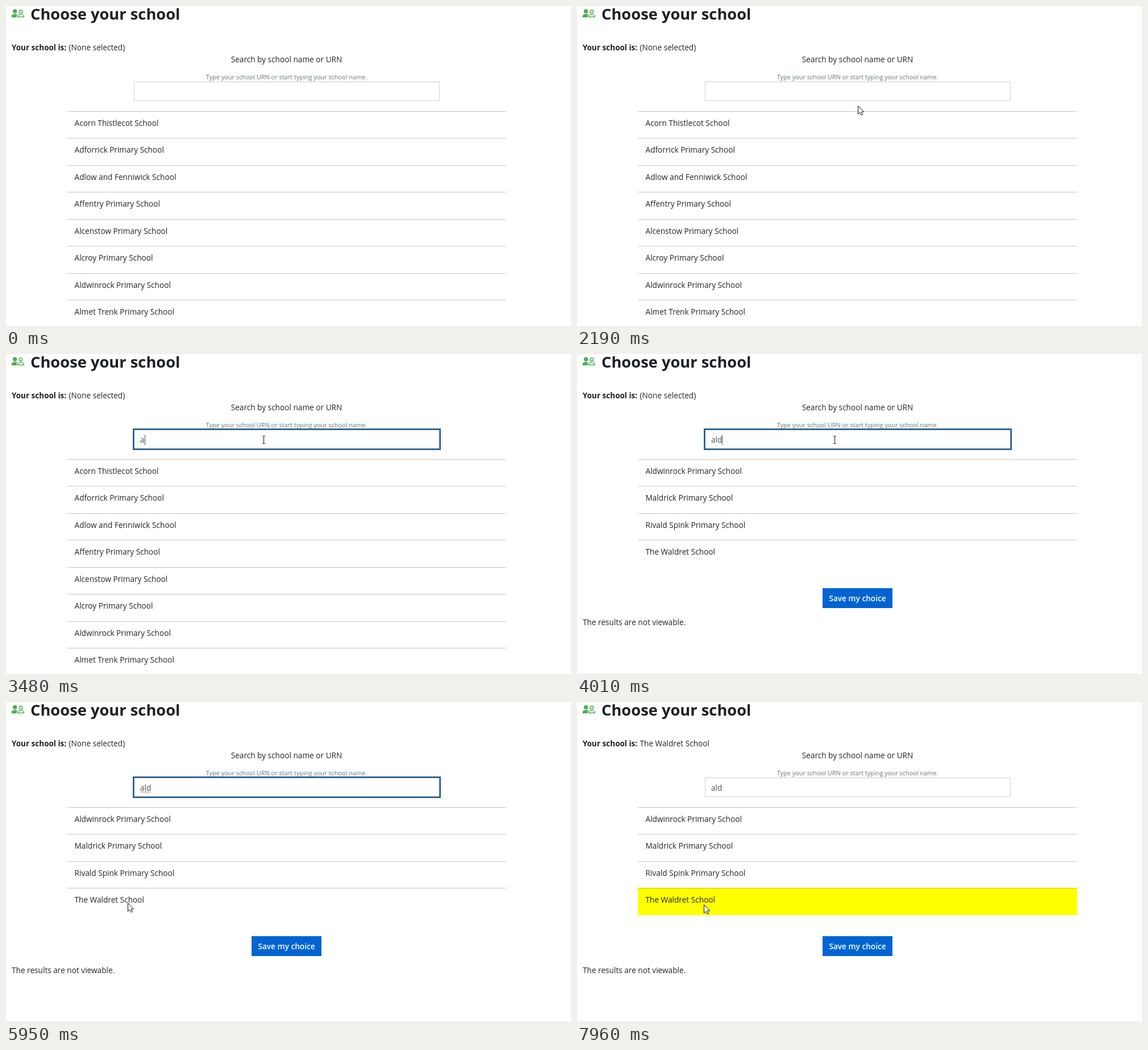
Write an HTML page that moves like this. It is 994 by 563 pixels and loops after 8000 ms.

```html
<!DOCTYPE html>
<html lang="en">
<head>
<meta charset="utf-8">
<title>Choose your school</title>
<style>
html, body { margin: 0; width: 100%; height: 100%; overflow: hidden; background: #fff; }
svg { display: block; width: 994px; height: 563px; }
text { font: 13.65px "Open Sans", "Noto Sans", sans-serif; fill: #212529; white-space: pre; }
.title { font-size: 27.3px; font-weight: 700; fill: #1d2125; }
.bold { font-size: 13.5px; font-weight: 700; fill: #1d2125; }
.mid { text-anchor: middle; }
.hint { font-size: 10.95px; fill: #6a737b; }
.typed { fill: #495057; }
.button { font-weight: 600; fill: #fff; }
</style>
</head>
<body>
<svg viewBox="0 0 994 563">
  <rect width="994" height="563" fill="#fff"/>
  <g fill="#4caf50">
    <circle cx="15.7" cy="9.2" r="3.7"/>
    <path d="M9.8 20v-2.2c0-2.4 3.2-3.8 6-3.8 1.6 0 3.2.4 4.4 1.1-1 .8-1.5 1.8-1.5 2.9v2z"/>
    <g fill="none" stroke="#4caf50" stroke-width="1.5">
      <circle cx="26" cy="9.8" r="2.8"/>
      <path d="M20.7 19.3v-1.3c0-1.8 2.7-3 5.3-3s5.3 1.2 5.3 3v1.3z"/>
    </g>
  </g>
  <text class="title" x="43" y="24">Choose your school</text>
  <text class="bold" x="10" y="78">Your school is:</text>
  <text id="chosen" x="110.5" y="78"></text>
  <text class="mid" x="493.5" y="99">Search by school name or URN</text>
  <text class="hint mid" x="493.5" y="129">Type your school URN or start typing your school name.</text>

  <rect id="field" x="225.5" y="133.5" width="537" height="33" fill="#fff"/>
  <rect id="ring" x="224" y="132" width="540" height="36" fill="none" stroke="#2a5f8c" stroke-width="2"/>
  <text id="typed" class="typed" x="236" y="156"></text>
  <path id="squiggle" fill="none" stroke="#e03c3c" stroke-width="1"/>
  <rect id="caret" y="142" width="1" height="18" fill="#495057"/>

  <rect id="mark" x="107" y="327" width="773" height="48" fill="#ff0"/>
  <g id="rows"></g>

  <g id="footer">
    <rect x="432" y="412" width="123" height="35" fill="#0064d2"/>
    <text class="button mid" x="493.5" y="435">Save my choice</text>
    <text x="10" y="477">The results are not viewable.</text>
    <rect y="562" width="990" height="1" fill="#e9eaec"/>
  </g>

  <path id="arrow" d="M.5.8V15.4L3.9 12.2 6.2 17 8.5 16 6.2 11.2H10.6Z" fill="#fff" stroke="#111" stroke-linejoin="round"/>
  <path id="beam" d="M-3-5.5H-1.2L-.5-5 .2-5.5H2M-.5-5V7M-3 7.5H-1.2L-.5 7 .2 7.5H2" fill="none" stroke="#333" stroke-width="1.2"/>
</svg>
<script>
const LOOP = 8000;
const CLICK = 2600, BLUR = 6070, PICK = 6130;
const $ = id => document.getElementById(id);
const primary = name => name + ' Primary School';

const allSchools = [
  'Acorn Thistlecot School',
  primary('Adforrick'),
  'Adlow and Fenniwick School',
  ...['Affentry', 'Alcenstow', 'Alcroy', 'Aldwinrock', 'Almet Trenk'].map(primary)
];
const alSchools = [
  ...allSchools.slice(4),
  ...['Alnwold', 'Alpenside', 'Alquorn House'].map(primary),
  'Altrick Cross Secondary School and Sixth Form College'
];
const aldSchools = [
  ...['Aldwinrock', 'Maldrick', 'Rivald Spink'].map(primary),
  'The Waldret School'
];

// time, typed text, caret x, visible list
const stages = [
  [0, '', 237, allSchools],
  [3480, 'a', 244, allSchools],
  [3780, 'al', 248, alSchools],
  [4010, 'ald', 255, aldSchools]
];

// time, is the caret shown
const blinks = [[0, 0], [CLICK, 1], [3120, 0], [3480, 1], [4510, 0], [5040, 1], [5570, 0]];

const easeOut = u => 1 - (1 - u) ** 2.2;
const easeBoth = u => u * u * (3 - 2 * u);
const linear = u => u;

// start, end, from, to, easing
const moves = [
  [1210, 1830, [936, 555], [506, 182], easeOut],
  [2150, 2190, [506, 182], [495, 175], linear],
  [2190, 2350, [495, 175], [454, 150], easeOut],
  [5400, 5950, [454, 150], [214, 353], easeBoth],
  [7945, 7960, [214, 353], [223, 356], linear]
];

const clamp = u => Math.min(1, Math.max(0, u));
const lastAt = (list, t) => list.filter(item => item[0] <= t).pop();
const show = (id, on) => $(id).setAttribute('visibility', on ? 'visible' : 'hidden');
const mix = (a, b, u) => a.map((v, i) => v + (b[i] - v) * u);

function setText(el, value) {
  if (el.textContent !== value) el.textContent = value;
}

function add(name, attrs) {
  const el = document.createElementNS('http://www.w3.org/2000/svg', name);
  for (const key in attrs) el.setAttribute(key, attrs[key]);
  $('rows').append(el);
  return el;
}

const rows = allSchools.map((_, i) => {
  const y = Math.floor(185 + 47.5 * i);
  return {
    line: add('rect', { x: 107, y: y - .5 * (i % 2 ? 0 : 1) + .5 * (i % 2 ? 0 : 1), width: 773, height: 1, fill: '#000', 'fill-opacity': .21 }),
    label: add('text', { x: 120.5, y: y + 26 })
  };
});

let wave = 'M236.5 159';
for (let i = 1; i <= 9; i++) wave += `l2 ${i % 2 ? -1.5 : 1.5}`;
$('squiggle').setAttribute('d', wave);

function pointer(t) {
  const move = lastAt(moves, t);
  if (!move) return null;
  const [start, end, from, to, ease] = move;
  return mix(from, to, ease(clamp((t - start) / (end - start))));
}

function drawPointer(t) {
  const at = pointer(t);
  const overField = at && at[1] < 167;
  show('arrow', at && !overField);
  show('beam', overField);
  if (!at) return;
  const place = `translate(${at.map(Math.round)})`;
  $('arrow').setAttribute('transform', place);
  $('beam').setAttribute('transform', place);
}

function drawField(t, typed, caretX) {
  const focused = t >= CLICK && t < BLUR;
  const glow = focused ? clamp((t - CLICK) / 140) : clamp(1 - (t - BLUR) / 90) * (t >= BLUR);
  const edge = mix([206, 208, 212], [80, 126, 163], glow).map(Math.round);
  $('field').setAttribute('stroke', `rgb(${edge})`);
  $('ring').setAttribute('opacity', focused ? glow : 0);
  setText($('typed'), typed);
  $('caret').setAttribute('x', caretX);
  show('caret', focused && lastAt(blinks, t)[1]);
  show('squiggle', t >= 5070 && focused);
}

function render(t) {
  const [, typed, caretX, schools] = lastAt(stages, t);
  const picked = t >= PICK;
  rows.forEach(({ line, label }, i) => {
    setText(label, schools[i] || '');
    line.setAttribute('visibility', schools[i] ? 'visible' : 'hidden');
  });
  setText($('chosen'), picked ? aldSchools[3] : '(None selected)');
  show('mark', picked);
  show('footer', schools === aldSchools);
  drawField(t, typed, caretX);
  drawPointer(t);
}

function tick() {
  render(performance.now() % LOOP);
  requestAnimationFrame(tick);
}
tick();
</script>
</body>
</html>
```
